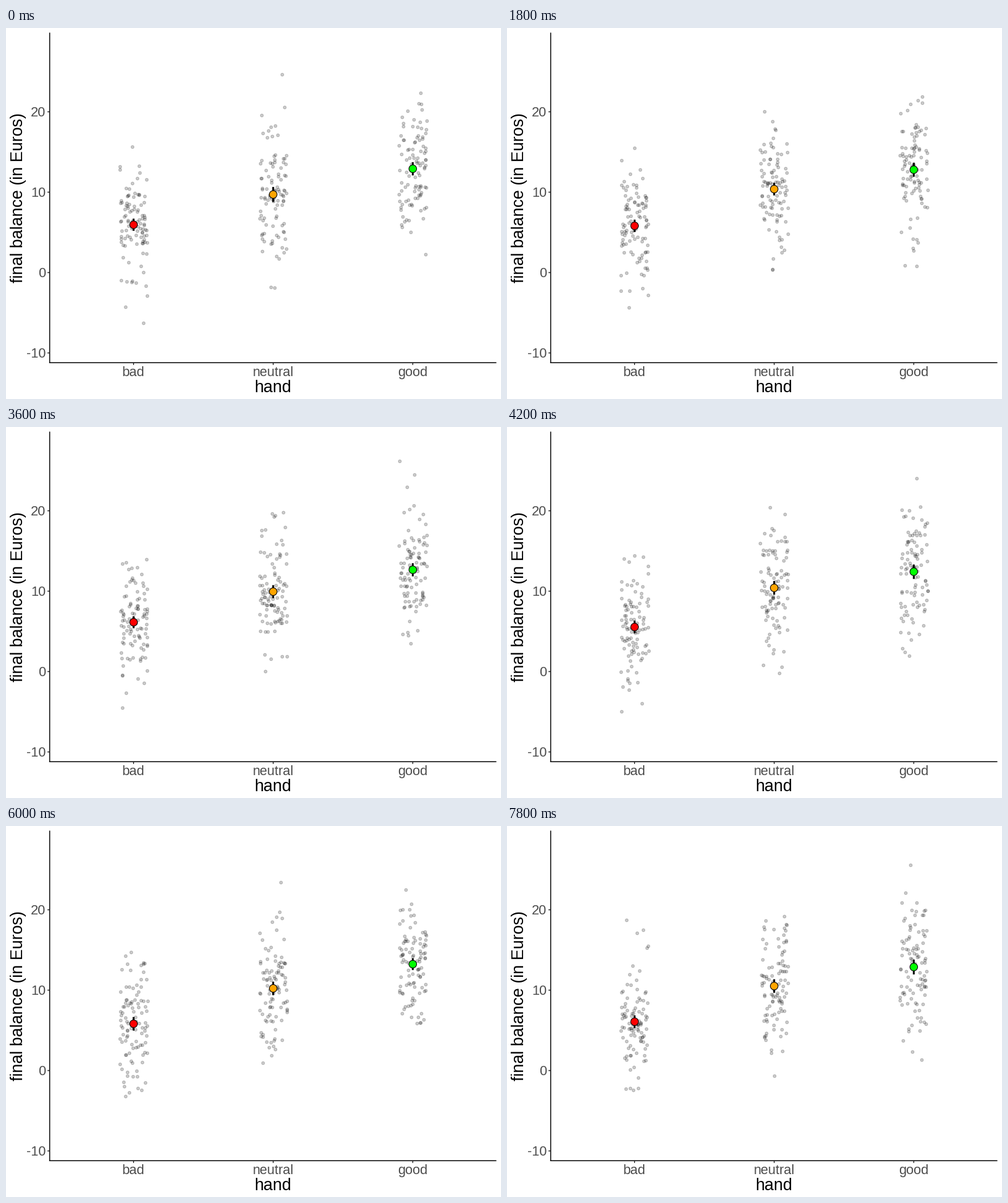
Write a matplotlib script that moves like this. It is 800 by 600 pixels and loops after 8000 ms.

```python
import numpy as np
import matplotlib.pyplot as plt
from matplotlib.animation import FuncAnimation

W, H, DPI = 800, 600, 100
PT = 72 / DPI                      # points per pixel
STEP, FRAMES, HOLD = 200, 40, 3    # ms per frame, frames, frames per sample
N = 100                            # players per hand
JITTER = 22.5                      # sideways scatter in pixels
SPREAD = 4.2                       # standard deviation in Euros

HANDS = ["bad", "neutral", "good"]
COLORS = ["#ff0000", "#ffa500", "#00ff00"]
MEANS = np.array([6.0, 10.25, 12.8])
CENTERS = 206.2 + 225.6 * np.arange(3)


def y_px(value):
    return 395.5 - 13.0 * np.asarray(value)


def draw_sample(rng):
    """Return dot positions, the means and the half widths of their intervals."""
    values = rng.normal(MEANS, SPREAD, (N, 3))
    xs = CENTERS + rng.uniform(-JITTER, JITTER, (N, 3))
    dots = np.column_stack([xs.ravel(), y_px(values).ravel()])
    half = 1.96 * values.std(axis=0, ddof=1) / np.sqrt(N)
    return dots, values.mean(axis=0), half


rng = np.random.RandomState(40)
SAMPLES = [draw_sample(rng) for _ in range(-(-FRAMES // HOLD))]

plt.rcParams["font.family"] = "Liberation Sans"
fig = plt.figure(figsize=(W / DPI, H / DPI), dpi=DPI, facecolor="white")
ax = fig.add_axes([0, 0, 1, 1])
ax.set(xlim=(0, W), ylim=(H, 0))
ax.axis("off")


def line(xs, ys, color="black", width=1.5, **kw):
    return ax.plot(xs, ys, color=color, lw=width * PT, snap=False,
                   solid_capstyle="butt", **kw)[0]


def label(x, y, text, size, color="black", ha="center", **kw):
    ax.text(x, y, text, fontsize=size * PT, color=color, ha=ha,
            va="baseline", **kw)


for value in (-10, 0, 10, 20):
    y = float(y_px(value))
    line([67, 70.6], [y, y], "#333333")
    label(64, y + 7.5, str(value), 21.8, "#4d4d4d", ha="right")
for x, name in zip(CENTERS, HANDS):
    line([x, x], [541.3, 545], "#333333")
    label(x - 0.3, 563, name, 21.8, "#4d4d4d")
line([70.6, 70.6], [7.5, 542])
line([69.9, 792.5], [541.3, 541.3])
label(431.6, 589, "hand", 26.9)
label(27.3, 274.8, "final balance (in Euros)", 26.9,
      rotation=90, rotation_mode="anchor")

cloud = ax.scatter([], [], s=(4.9 * PT) ** 2, facecolor=(0, 0, 0, 0.2),
                   edgecolor=(0, 0, 0, 0.25), linewidth=0.8 * PT, zorder=3)
bars = [line([x, x], [0, 0], width=3, zorder=4) for x in CENTERS]
mean_dots = ax.scatter(CENTERS, [0] * 3, s=(12.4 * PT) ** 2, c=COLORS,
                       edgecolor="black", linewidth=1.1 * PT, zorder=5)


def update(i):
    dots, means, halves = SAMPLES[i // HOLD]
    cloud.set_offsets(dots)
    mean_dots.set_offsets(np.column_stack([CENTERS, y_px(means)]))
    for bar, mean, half in zip(bars, means, halves):
        bar.set_ydata(y_px([mean - half, mean + half]))
    return [cloud, mean_dots, *bars]


anim = FuncAnimation(fig, update, frames=FRAMES, interval=STEP,
                     repeat=True, repeat_delay=0, blit=False)
plt.show()
```
